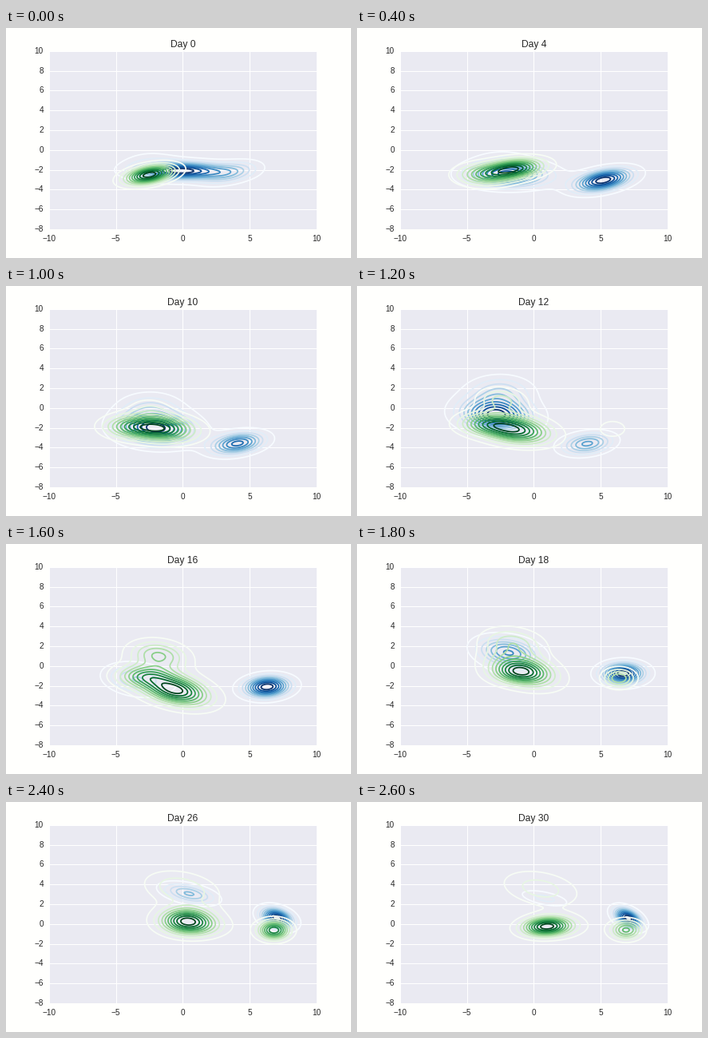
A matplotlib script for the animation above (2800 ms loop, 432 px wide and 288 px high).

```python
import matplotlib
import matplotlib.pyplot as plt
import numpy as np
from matplotlib.animation import FuncAnimation

matplotlib.rcParams["font.family"] = "Liberation Sans"
INK = "#262626"
DAYS = [*range(0, 22, 2), 22, 26, 30]
LAST = len(DAYS) - 1
LEVELS = np.arange(1, 11) / 10.8

X, Y = np.meshgrid(np.linspace(-10, 10, 180), np.linspace(-8, 10, 170))

# A herd is a path of (frame, x, y, weight) and a rule that gives
# (spread x, spread y, correlation) from the loop's progress t.
BLUE = [
    # west
    ([(0, 0, -2.1, 1), (2, -1.9, -2.5, .8), (4, -1.2, -3.4, 1),
      (6, -2.8, -.7, 1), (8, -3.6, -1.3, .33), (10, -.2, 4, 1),
      (13, .8, 2.6, .22)],
     lambda t: (2 - .8 * t, .55 + .5 * np.sin(np.pi * t), -.55 * t * t)),
    # east
    ([(0, 3.6, -2.3, .35), (2, 5.2, -3.05, 1), (4, 4.2, -3.55, 1),
      (6, 4, -3.6, .6), (8, 6.3, -2.1, 1), (10, 7.05, .6, 1)],
     lambda t: (1.35 - .7 * t * t, .75 - .1 * t, .45 - .9 * t * t)),
    # north
    ([(4, -2.4, -1.5, .15), (6, -2.5, 1.7, .33), (8, -2, -1.5, .08)],
     lambda t: (1.5, 1, 0)),
]
GREEN = [
    # centre
    ([(0, -2.5, -2.5, 1), (2, -1.5, -1.9, 1), (4, -1.9, -1.95, 1),
      (6, -1.4, -2.2, 1), (8, -.6, -2.4, 1), (10, -1, 1.5, .5),
      (13, .9, -.25, 1)],
     lambda t: (1.15 + .5 * np.sin(np.pi * t),
                .62 + .45 * np.sin(np.pi * t * t),
                .4 * np.cos(1.6 * np.pi * t))),
    # side
    ([(0, -3, -2.5, 0), (2, -3.8, -2.5, .5), (4, -4.3, -2.2, .5),
      (8, -3, -1, .45), (10, .3, -.4, .25), (13, 2, -.3, .15)],
     lambda t: (1.3, .7, 0)),
    # north
    ([(4, -2.4, -1, 0), (6, -2.4, .8, .35), (8, -1.8, 1.1, .48),
      (10, -1.3, 3.6, .23), (13, .5, 3.6, .26)],
     lambda t: (.5 + 1.4 * t, .5 + .7 * t, -.3 * t)),
    # east
    ([(4, 5.5, -2.2, 0), (6, 5.9, -2.1, .2), (8, 6.1, -1.8, 0),
      (10, 6.65, -.65, 1), (13, 6.9, -.6, .65)],
     lambda t: (.75, .62, 0)),
]


def bell(x, y, sx, sy, r):
    u, v = (X - x) / sx, (Y - y) / sy
    return np.exp(-(u * u - 2 * r * u * v + v * v) / (2 - 2 * r * r))


def density(herds, frame):
    z = np.zeros_like(X)
    for path, shape in herds:
        times, *tracks = zip(*path)
        x, y, w = (np.interp(frame, times, track) for track in tracks)
        sx, sy, r = shape(frame / LAST)
        # Stragglers form a wide, faint halo around the core.
        z += w * (bell(x, y, sx, sy, r)
                  + .13 * bell(x, y, 1.6 * sx, 1.6 * sy, r))
    return z / z.max()


fig = plt.figure(figsize=(6, 4), dpi=72, facecolor="#fffffd")
ax = fig.add_axes([.125, .125, .775, .775], facecolor="#eaeaf2")
ax.set(xlim=(-10, 10), ylim=(-8, 10),
       xticks=range(-10, 11, 5), yticks=range(-8, 11, 2))
ax.set_axisbelow(True)
ax.grid(color="white", linewidth=1)
ax.tick_params(length=0, pad=7, labelsize=10, labelcolor=INK)
for label in ax.get_yticklabels():
    label.set_va("center")
for spine in ax.spines.values():
    spine.set_visible(False)
title = ax.set_title("", fontsize=12, color=INK, pad=5)
drawn = []


def draw(frame):
    while drawn:
        drawn.pop().remove()
    for herds, cmap in ((BLUE, "Blues"), (GREEN, "Greens")):
        drawn.append(ax.contour(X, Y, density(herds, frame), LEVELS,
                                cmap=cmap, linewidths=1.75))
    title.set_text(f"Day {DAYS[frame]}")
    return [title]


anim = FuncAnimation(fig, draw, frames=len(DAYS), interval=200,
                     init_func=lambda: [title], repeat=True, repeat_delay=0,
                     blit=False)
plt.show()
```
